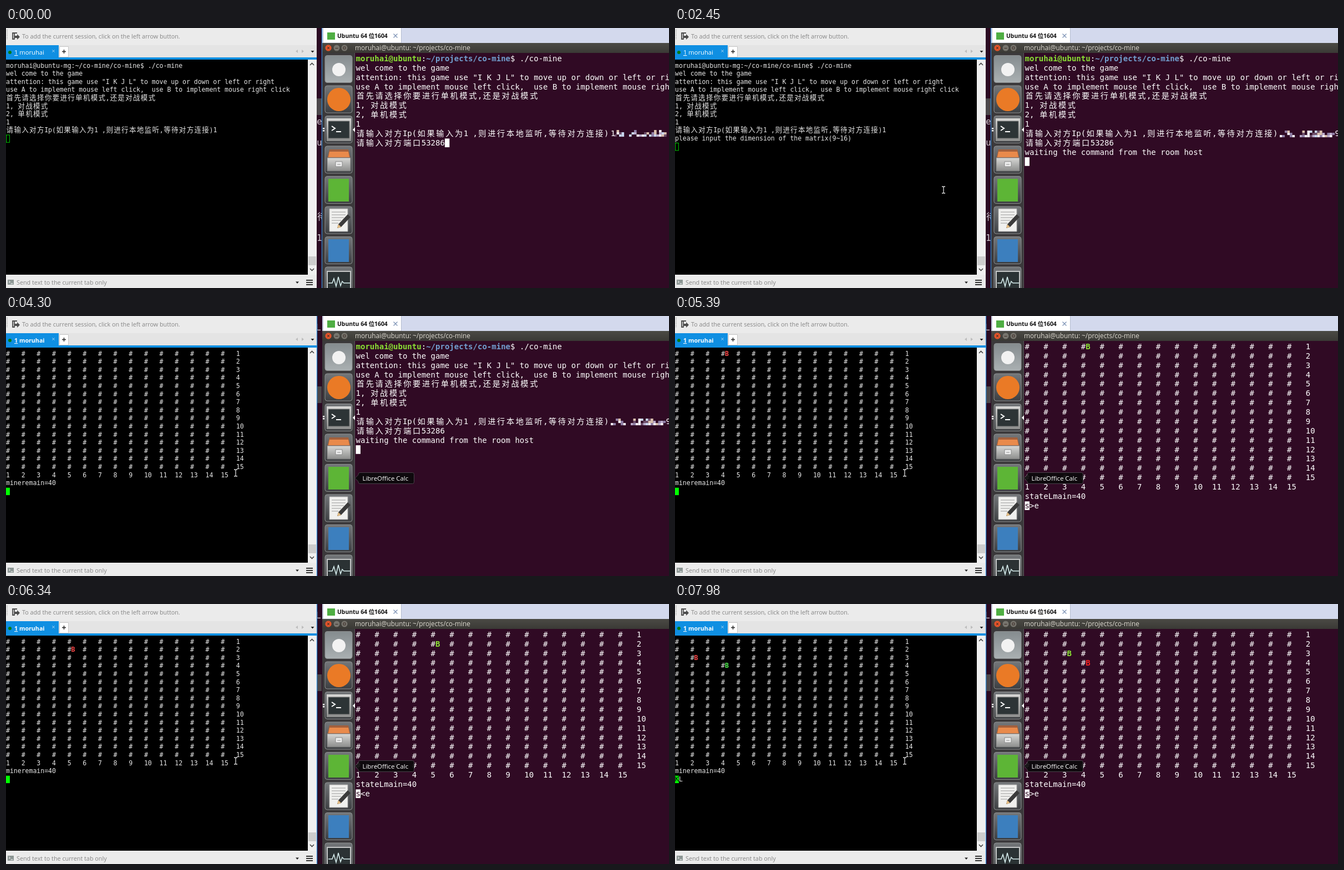
An HTML page for the animation above (8000 ms loop, 1195 by 469 pixels).

```html
<!DOCTYPE html>
<html lang="en">
<head>
<meta charset="utf-8">
<title>Two terminals</title>
<style>
html, body { margin: 0; width: 100%; height: 100%; overflow: hidden; background: #000; }
svg { display: block; width: 100vw; height: 100vh; }
text { white-space: pre; }
.ui { font-family: "Open Sans", "Noto Sans", "Noto Sans CJK SC", sans-serif; }
.mono { font-family: "DejaVu Sans Mono", "Noto Sans Mono", monospace; }
.cjk { font-family: "Noto Sans CJK SC", "Noto Sans CJK", sans-serif; }
.bold { font-weight: 700; }
</style>
</head>
<body>
<svg id="stage" viewBox="0 0 1195 469" preserveAspectRatio="none">
  <defs>
    <linearGradient id="tile" x2="0" y2="1"><stop stop-color="#74777a"/><stop offset="1" stop-color="#3d3f42"/></linearGradient>
    <linearGradient id="pale" x2="0" y2="1"><stop stop-color="#858c8f"/><stop offset="1" stop-color="#aab0b2"/></linearGradient>
    <linearGradient id="bar" x2="0" y2="1"><stop stop-color="#4b4a45"/><stop offset="1" stop-color="#3a3935"/></linearGradient>
    <linearGradient id="steel" x2="0" y2="1"><stop stop-color="#d8d8d6"/><stop offset="1" stop-color="#8d8e8d"/></linearGradient>
    <clipPath id="gap"><path d="M561 0h8v469h-8z"/></clipPath>
  </defs>

  <!-- left window -->
  <path fill="#ebebeb" d="M0 0h560v469H0z"/>
  <path stroke="#9a9a9a" stroke-width="1.5" stroke-dasharray="1.5 2" d="M2 3v18"/>
  <path fill="none" stroke="#4c4c4c" stroke-width="1.8" d="M20 9h-8v11h3M15 10v11"/>
  <path fill="#4c4c4c" d="M16 14h4v-3l5 5-5 5v-3h-4z"/>
  <text class="ui" x="29" y="19" font-size="10.75" fill="#868686">To add the current session, click on the left arrow button.</text>
  <path fill="#e4e4e4" d="M0 31h560v22H0z"/>
  <path fill="#0f8fe2" d="M0 31h95v22H0zM0 53h560v4H0z"/>
  <circle cx="7" cy="44" r="3" fill="#087a12"/>
  <text id="tabName" class="ui" x="15" y="48" fill="#fff"><tspan text-decoration="underline">1</tspan> moruhai</text>
  <path stroke="#b9dcf5" d="M83.500 39.500l4 4m0-4l-4 4"/>
  <path fill="#fff" stroke="#c6c6c6" d="M96.500 33.500h16v19h-16z"/>
  <path stroke="#222" stroke-width="1.400" d="M101 42.500h7M104.500 39v7"/>
  <path fill="#bdbdbd" d="M526 39v6l-4-3zM533 39v6l4-3z"/>
  <path fill="#222" d="M549.500 41h6l-3 3.500z"/>
  <path d="M0 57h544v388H0z"/>
  <path fill="#f0f0f0" d="M544 57h16v388h-16z"/>
  <path fill="#cdcdcd" d="M545 412h14v16h-14z"/>
  <path fill="none" stroke="#444" stroke-width="1.600" d="M548 67l3.500-3.500L555 67M548 434l3.500 3.500L555 434"/>
  <path fill="#8c9694" d="M3 454h11v9H3z"/>
  <path fill="none" stroke="#fff" d="M5 456l2.500 2-2.500 2M8.500 461h4"/>
  <text class="ui" x="19" y="463" font-size="10.8" fill="#868686">Send text to the current tab only</text>
  <path fill="#222" d="M522 457.500h6l-3 3.500z"/>
  <path stroke="#333" stroke-width="2" d="M541 455h12M541 459h12M541 463h12"/>

  <!-- strip between the windows -->
  <path fill="#2b0a22" d="M560 0h10v469h-10z"/>
  <path fill="#4c484b" d="M560 127h9v30h-9z"/>
  <g clip-path="url(#gap)" class="mono" font-size="16" fill="#cfc8cd">
    <g id="oldGap"><text x="560" y="174">e</text><text x="560" y="212">u</text><text class="cjk" x="561" y="346">待</text><text x="560" y="384">1</text></g>
    <text id="newGap" x="558" y="26">L</text>
  </g>
  <path id="edge" d="M0 0v469" stroke="#2f8bd8" stroke-width="1.300"/>

  <!-- right window -->
  <path fill="#d3d9ed" d="M570 0h625v27H570z"/>
  <path fill="#fff" stroke="#b4bccf" d="M571.500-1h141v28h-141z"/>
  <path fill="#4fae43" d="M579 8h14v13h-14z"/>
  <text class="ui bold" x="597" y="18" font-size="10.4" fill="#111">Ubuntu 64 位1604</text>
  <path stroke="#7d93b5" stroke-width="1.300" d="M698.500 10.500l7 7m0-7l-7 7"/>
  <path fill="url(#bar)" d="M570 27h625v18H570z"/>
  <circle cx="581" cy="36" r="5.700" fill="#e0532a"/>
  <g fill="#77756e"><circle cx="596" cy="36" r="5.500"/><circle cx="610" cy="36" r="5.500"/></g>
  <path fill="none" stroke="#3a2b25" d="M579 34l4 4m0-4l-4 4M593.500 36.500h5M608 34h4v4h-4z"/>
  <text class="ui" x="629" y="40" font-size="11.8" fill="#dfdbd2">moruhai@ubuntu: ~/projects/co-mine</text>
  <path fill="#300a24" d="M629 45h566v424H629z"/>
  <path fill="#3b393b" d="M570 45h59v424h-59z"/>
  <path fill="#59575a" d="M628 45h1v424h-1z"/>
  <g id="tiles"></g>
  <circle cx="600" cy="75" r="12" fill="#f2f2f2"/>
  <circle cx="600" cy="129" r="21" fill="#ea7a26"/>
  <path fill="url(#steel)" d="M578 163h44v41h-44z"/>
  <path fill="#2d3436" stroke="#777" d="M581 168h38v31h-38z"/>
  <path fill="none" stroke="#fff" stroke-width="2" d="M587 177l6 4-6 4M595 187h9"/>
  <path fill="#fff" d="M571 180h3v2.500h-3zM571 184h3v2.500h-3zM629 179v9l-4-4.500z"/>
  <path fill="#a4603c" d="M583 219h34l4 17h-42z"/>
  <path fill="#e98a4b" d="M583 223h34l2 10h-38z"/>
  <path fill="url(#steel)" stroke="#777" d="M579 234h42v24h-42z"/>
  <path fill="#eee" stroke="#888" d="M594 241h12v9h-12zM597 246h6"/>
  <path fill="#5db536" d="M581 272h37v41h-37z"/>
  <path fill="#f0f0ee" stroke="#aaa" d="M583 326h33v41h-33z"/>
  <path stroke="#999" d="M587 332h25M587 337h25M587 342h22M587 347h17M587 352h12"/>
  <path fill="#3b3b3b" d="M597 361l2-7 17-18 5 5-17 18z"/><path fill="#e5bd82" d="M597 361l2-7 5 5z"/>
  <path fill="#3c7fbe" d="M581 381h37v41h-37z"/>
  <path fill="#2b3234" stroke="#c5c7c7" stroke-width="2" d="M579 439h42v40h-42z"/>
  <path fill="none" stroke="#d7eeee" stroke-width="1.500" d="M581 460h7l3-8 4 14 4-17 4 16 3-8 3 3h11"/>

  <g id="terms"></g>
  <g id="tip">
    <path fill="#0b090b" fill-opacity=".9" stroke="#4a414a" d="M629 292.500l6-6v-1q0-3 3-3h94.500q3 0 3 3v14q0 3-3 3H638q-3 0-3-3v-1z"/>
    <text class="ui" x="642.500" y="296.500" font-size="11.4" fill="#fff">LibreOffice Calc</text>
  </g>
  <path id="hand" fill="#fff" stroke="#222" stroke-width=".7" d="M-3-8q2-2 3 0v6l8 2q2 1 1.500 4l-2 6H-1l-6-7q0-2 2-2l2 2z" transform="translate(0 0)"/>
  <path id="beam" fill="none" stroke="#ddd" stroke-width="1.300" d="M-3-6h2l1 1 1-1h2M0-5v10M-3 6h2l1-1 1 1h2"/>
</svg>
<script>
const LOOP = 8000, SIZE = 15;
const $ = id => document.getElementById(id);
const show = (el, on) => { el.style.display = on ? '' : 'none'; };
const place = (el, x, y) => el.setAttribute('transform', `translate(${x} ${y})`);

function add(parent, tag, attrs = {}, content) {
  const el = document.createElementNS('http://www.w3.org/2000/svg', tag);
  for (const key in attrs) el.setAttribute(key, attrs[key]);
  if (content !== undefined) el.textContent = content;
  return parent.appendChild(el);
}

// cell: character width, pitch: line height, cjk: size of a wide glyph
const left = { x: 0, y: 71.6, cell: 6.917, pitch: 14.6, size: 11.49, cjk: 12.6, ink: '#e6e6e6', green: '#50f050', red: '#ff4848' };
const right = { x: 630.5, y: 60, cell: 8.443, pitch: 16.87, size: 14.03, cjk: 14.2, ink: '#fff', green: '#8ae234', red: '#f32222' };
const cellX = (term, col) => term.x + col * term.cell;
const rowY = (term, row) => term.y + row * term.pitch;

function write(parent, term, col, row, str, fill = term.ink, bold = false) {
  const line = add(parent, 'text', { class: 'mono' + (bold ? ' bold' : ''), y: rowY(term, row), 'font-size': term.size, fill });
  for (const run of str.match(/[\u4e00-\u9fff]+|[^\u4e00-\u9fff]+/g) || []) {
    const wide = run.charCodeAt(0) > 255;
    const gap = 2 * term.cell - term.cjk;
    const attrs = { x: cellX(term, col) + (wide ? gap / 2 : 0) };
    if (wide) Object.assign(attrs, { class: 'cjk', 'font-size': term.cjk, 'letter-spacing': gap });
    add(line, 'tspan', attrs, run);
    col += run.length * (wide ? 2 : 1);
  }
  return line;
}

const INTRO = [
  'wel come to the game',
  'attention: this game use "I K J L" to move up or down or left or right',
  'use A to implement mouse left click,  use B to implement mouse right click',
  '首先请选择你要进行单机模式,还是对战模式',
  '1, 对战模式', '2, 单机模式', '1'
];
const ASK_IP = '请输入对方Ip(如果输入为1 ,则进行本地监听,等待对方连接)';

function makeTerm(term) {
  term.root = add($('terms'), 'g');
  term.intro = add(term.root, 'g');
  term.board = add(term.root, 'g');
  INTRO.forEach((s, i) => write(term.intro, term, 0, i + 1, s));
  const nums = Array.from({ length: SIZE }, (_, i) => i + 1);
  for (const n of nums) write(term.board, term, 0, n - 1, '#   '.repeat(SIZE) + n);
  write(term.board, term, 0, SIZE, nums.map(n => String(n).padEnd(4)).join(''));
  term.caret = add(term.root, 'rect', { width: term.cell, height: term.pitch - 1.2 });
  term.own = write(term.root, term, 0, 0, 'B', term.green, true);
  term.foe = write(term.root, term, 0, 0, 'B', term.red, true);
}
makeTerm(left);
makeTerm(right);

write(left.intro, left, 0, 0, 'moruhai@ubuntu-mg:~/co-mine/co-mine$ ./co-mine');
write(left.intro, left, 0, 8, ASK_IP + '1');
const askSize = write(left.intro, left, 0, 9, 'please input the dimension of the matrix(9~16)');
const typed = write(left.intro, left, 0, 10, ' ');
write(left.board, left, 0, 16, 'mineremain=40');
const echo = write(left.root, left, 0, 17, ' ');
const echoKey = write(left.root, left, 0, 17, ' ', '#000');

write(right.intro, right, 0, 0, 'moruhai@ubuntu', right.green, true);
write(right.intro, right, 14, 0, ':');
write(right.intro, right, 15, 0, '~/projects/co-mine', '#729fcf', true);
write(right.intro, right, 33, 0, '$ ./co-mine');
write(right.intro, right, 0, 8, ASK_IP);
write(right.intro, right, 0, 9, '请输入对方端口53286');
const waiting = write(right.intro, right, 0, 10, 'waiting the command from the room host');
const status = write(right.board, right, 0, 16, ' ');
const prompt = write(right.board, right, 1, 17, ' ');
const promptKey = write(right.root, right, 0, 17, 's', '#300a24');

// blurred address
function mosaic(x0, y0, seed, w) {
  const g = add(right.intro, 'g');
  const tones = ['#f4eef6', '#b9a9c9', '#8f7fa6', '#d9bfae', '#c9d6ee', '#6c4d69'];
  const rand = () => (seed = (seed * 16807) % 2147483647) / 2147483647;
  for (let x = x0; x < x0 + w; x += 4.5)
    for (let r = 0; r < 3; r++) {
      const tone = tones[Math.floor(rand() * tones.length)];
      const gap = x > 1113 && x < 1119;
      if (!gap && rand() < .3 + r * .22) add(g, 'rect', { x, y: y0 + r * 4, width: 4.6, height: 4.1, fill: tone });
    }
  return g;
}
const blurA = mosaic(1096, 184, 4711, 99);
write(blurA, right, 54.4, 8, '1');
const blurB = mosaic(1090, 185, 9203, 98);
write(blurB, right, 66.2, 8, '9');

for (let i = 0; i < 8; i++)
  add($('tiles'), 'rect', { x: 575, y: 49.5 + i * 54.5, width: 49, height: 49, rx: 4, fill: i ? 'url(#tile)' : 'url(#pale)', stroke: '#8d8f90' });

// time, delay on the other side, column, row, key, mark
const GUEST = [
  [4620, 0, 15, 1, '', '>'], [4790, 70, 1, 1, 'L', '>'], [4940, 70, 2, 1, 'L', '>'],
  [5160, 80, 3, 1, 'L', '>'], [5390, 0, 4, 1, 'L', '>'], [5630, 80, 4, 2, 'K', '<'],
  [6020, 80, 5, 2, 'L', '<'], [6500, 80, 4, 2, 'J', '<'], [6820, 80, 4, 3, 'K', '<'],
  [7050, 80, 3, 3, 'J', '<'], [7290, 80, 2, 3, 'J', '<'], [7670, 0, 1, 3, 'J', '<'],
  [7820, 0, 2, 3, 'L', '<'], [7980, 80, 3, 3, 'L', '>']
];
// time, column, row, typed keys
const HOST = [
  [6820, 2, 1, 'L'], [6980, 3, 1, 'L'], [7130, 4, 1, 'L'],
  [7290, 4, 2, 'KL'], [7440, 4, 3, 'KL'], [7670, 4, 4, 'KL']
];
const BEAM = [
  [1140, 988, 366], [1930, 922, 361], [2010, 858, 358], [2290, 705, 331], [2370, 577, 308],
  [2450, 484, 292], [2530, 452, 288], [2610, 431, 285], [2690, 419, 284], [2770, 414, 283]
];
const last = (table, t, when = s => s[0]) => table.filter(s => when(s) <= t).pop();

function piece(el, term, col, row) {
  show(el, col);
  if (col) place(el, (4 * col - 3) * term.cell, (row - 1) * term.pitch);
}
function caret(term, col, row, attrs) {
  const inset = attrs.fill === 'none' ? .5 : 0;
  Object.assign(attrs, {
    x: cellX(term, col) + inset,
    y: rowY(term, row) - term.size * .92 + .5,
    width: term.cell - 2 * inset
  });
  for (const key in attrs) term.caret.setAttribute(key, attrs[key]);
}
const setText = (line, s) => { line.firstChild.textContent = s; };

function draw(t) {
  const focus = t >= 3140, hostBoard = t >= 4300, guestBoard = t >= 4390;
  const guest = last(GUEST, t), seen = last(GUEST, t, s => s[0] + s[1]), host = last(HOST, t);

  $('tabName').setAttribute('font-weight', focus ? 700 : 400);
  $('tabName').setAttribute('font-size', focus ? 10.7 : 11.2);
  $('edge').setAttribute('transform', `translate(${focus ? 560.5 : 569.5} 0)`);
  show($('oldGap'), t < 3690);
  show($('newGap'), t >= 3690);
  show($('tip'), t >= 3000);

  // host terminal
  show(left.intro, !hostBoard);
  show(left.board, hostBoard);
  show(askSize, t >= 1930);
  const size = t >= 3920 ? '15' : t >= 3840 ? '1' : '';
  setText(typed, size);
  const keys = host ? host[3] : '';
  setText(echo, keys);
  setText(echoKey, keys.slice(0, 1));
  show(echo, false);
  const look = focus ? { fill: '#00ff00', stroke: 'none' } : { fill: 'none', stroke: '#00c800' };
  if (hostBoard) caret(left, 0, 17, look);
  else caret(left, size.length, t >= 1930 ? 10 : 9, look);
  if (keys.length > 1) {
    show(echo, true);
    setText(echo, ' ' + keys.slice(1));
  }
  piece(left.own, left, host && host[1], host && host[2]);
  piece(left.foe, left, seen && seen[2], seen && seen[3]);

  // guest terminal
  show(right.intro, !guestBoard);
  show(right.board, guestBoard);
  show(blurA, t < 70);
  show(blurB, t >= 70);
  show(waiting, t >= 1850);
  setText(status, guest && guest[4] ? `state${guest[4]}main=40` : 'mineremain=40');
  setText(prompt, guest ? guest[5] + 'e' : '');
  show(promptKey, guest);
  const white = { fill: '#fff' };
  if (guestBoard) caret(right, 0, 17, white);
  else if (t >= 1850) caret(right, 0, 11, white);
  else if (t >= 1770) caret(right, 0, 10, white);
  else caret(right, 19, 9, white);
  piece(right.own, right, guest && guest[2], guest && guest[3]);
  piece(right.foe, right, host && host[1], host && host[2]);

  // pointer
  show($('hand'), t >= 290 && t < 1070);
  const step = Math.min(7, Math.floor((t - 290) / 75.7)), rest = (1 - step / 7) ** 1.5;
  place($('hand'), 990 + 87 * rest, 375 + 76 * rest);
  const beam = last(BEAM, t);
  show($('beam'), beam);
  if (beam) place($('beam'), beam[1], beam[2]);
}

const start = performance.now();
function tick() {
  draw((performance.now() - start) % LOOP);
  requestAnimationFrame(tick);
}
tick();
</script>
</body>
</html>
```
